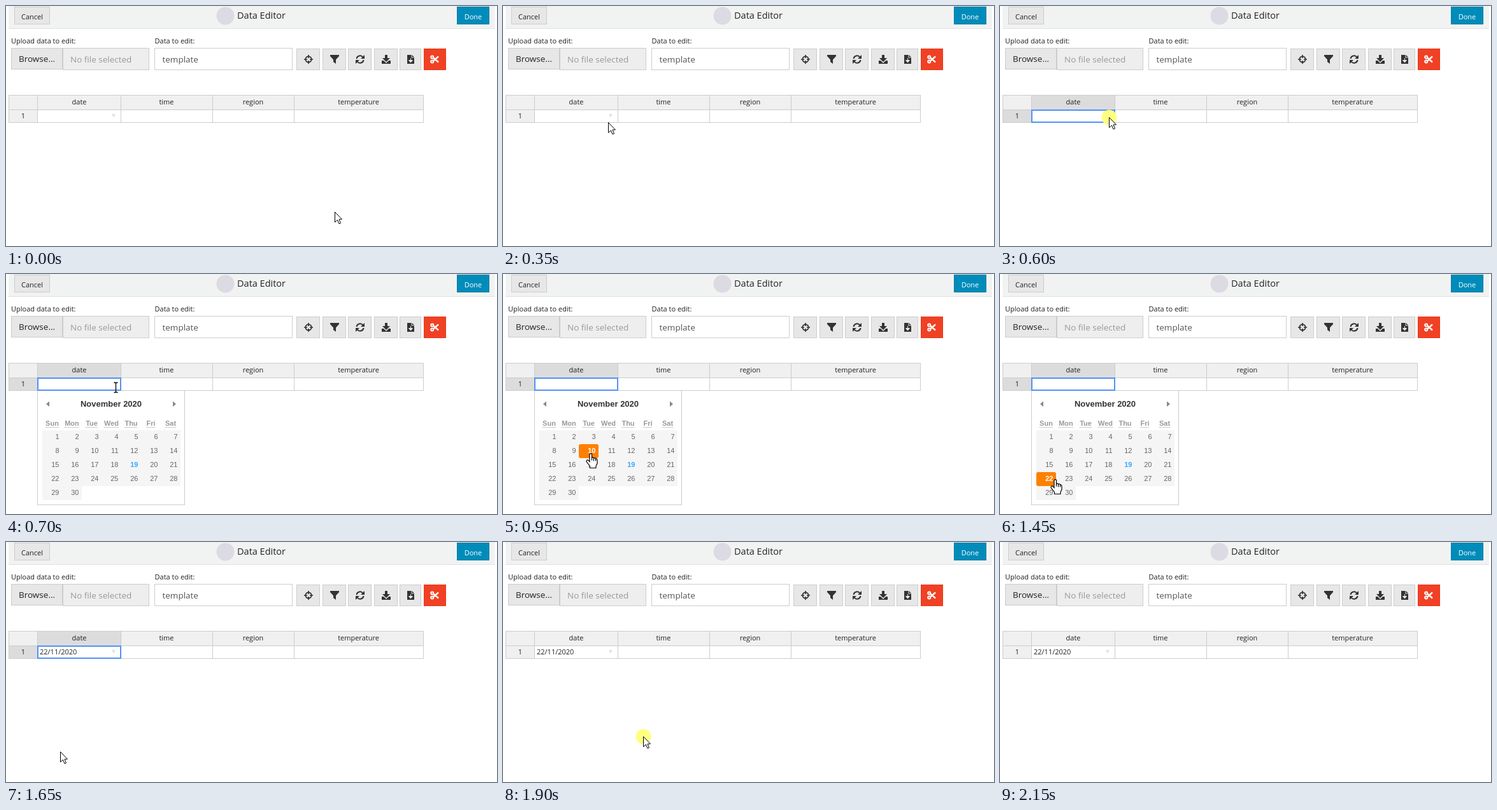
An HTML page for the animation above (2.25 s loop, 771x378 px).

```html
<!DOCTYPE html>
<html lang="en">
<head>
<meta charset="utf-8">
<title>Data Editor</title>
<style>
  html, body { margin: 0; width: 100%; height: 100%; overflow: hidden; background: #fff; }
  svg { display: block; width: 771px; height: 378px; }
  text { font: 11px "Open Sans", sans-serif; fill: #222; }
  .mid { text-anchor: middle; }
  .big { font-size: 13.5px; }
  .box { stroke: #ccc; }
  .icon { fill: none; stroke: #333; stroke-width: 2; }
  .solid { fill: #333; stroke: none; }
  #calendar text { font-family: "Liberation Sans", Arial, sans-serif; fill: #666; }
  #calendar .bold { font-weight: bold; }
  #calendar .weekday { fill: #999; font-weight: bold; }
  #calendar .today { fill: #3af; font-weight: bold; }
  #calendar .hover { fill: #fff; font-weight: bold; }
</style>
</head>
<body>
<svg viewBox="0 0 771 378">
  <rect x="4" width="764" height="35" fill="#f1f3f3"/>
  <path d="M4 35.5H768" stroke="#e0e0e0"/>
  <rect class="box" x="13.5" y="1.500" width="55" height="27" fill="#e7e7e7"/>
  <text class="mid" x="41" y="21">Cancel</text>
  <rect x="708.5" y="1.5" width="50" height="27" fill="#008cba" stroke="#0079a1"/>
  <text class="mid" x="733.5" y="21" style="fill:#fff">Done</text>
  <circle cx="344.500" cy="15.500" r="14" fill="#dcdae2"/>
  <text x="363" y="20" style="font-size:14.5px">Data Editor</text>

  <text x="8" y="59">Upload data to edit:</text>
  <text x="233.500" y="59">Data to edit:</text>
  <rect class="box" x="89.5" y="66.5" width="135" height="34" fill="#eee"/>
  <rect class="box" x="8.5" y="66.5" width="80" height="33" fill="#e7e7e7"/>
  <rect class="box" x="233.5" y="66.5" width="216" height="34" fill="#fff"/>
  <text class="big" x="20" y="88">Browse...</text>
  <text class="big" x="101" y="89" style="fill:#999">No file selected</text>
  <text class="big" x="245.500" y="89" style="fill:#555">template</text>

  <g id="buttons"></g>
  <g class="icon">
    <g transform="translate(475 84)">
      <circle r="4.700" stroke-width="1.700"/><path d="M-7 0H-2M2 0H7M0-7V-2M0 2V7" stroke-width="1.700"/>
    </g>
    <path class="solid" d="M509 77H523V79L518 84.500V91L514 88V84.500L509 79Z"/>
    <g transform="translate(556 84)">
      <path d="M-5.500-1A5.600 5.600 0 0 1 4.500-3.500M5.500 1A5.600 5.600 0 0 1-4.500 3.500"/>
      <path class="solid" d="M7-7V-1H1ZM-7 7V1H-1Z"/>
    </g>
    <path class="solid" d="M595 77H599V82H603L597 88L591 82H595ZM590 86H593L597 90L601 86H604V91H590Z"/>
    <path class="solid" d="M630 77H636.500V81.500H641V91H630ZM637.500 77L641 80.500H637.500Z"/>
    <path d="M635.500 82V86M632.500 85.500H638.500L635.500 89Z" stroke="#e7e7e7" fill="#e7e7e7" stroke-width="1"/>
  </g>
  <g transform="translate(673 84)" fill="none" stroke="#fff" stroke-width="2">
    <circle cx="-3.800" cy="-3.500" r="2"/><circle cx="-3.800" cy="3.500" r="2"/>
    <path d="M-2-2.500L6 4.500M-2 2.500L6-4.500" stroke-width="2.400"/>
  </g>

  <rect x="4" y="140" width="652" height="23" fill="#f0f0f0"/>
  <rect x="4" y="163" width="45" height="21" fill="#f0f0f0"/>
  <path id="selected" d="M49 140H180V163H49V184H4V163H49Z" fill="#dcdcdc"/>
  <path d="M4 140.500H656M4 163.500H656M4 183.500H656M4.500 140V184M49.500 140V184M180.500 140V184M324.500 140V184M452.500 140V184M655.500 140V184" stroke="#ccc"/>
  <g class="mid">
    <text x="115" y="155">date</text><text x="252" y="155">time</text>
    <text x="388" y="155">region</text><text x="553.500" y="155">temperature</text>
    <text x="27" y="177">1</text>
  </g>
  <path id="dropdown" d="M166 170H172L169 176Z" fill="#e3e3e3"/>
  <text id="value" x="53" y="177">22/11/2020</text>
  <g id="calendar">
    <rect class="box" x="49.5" y="183.500" width="231" height="180" fill="#fff"/>
    <path d="M68 200.500V209L63 204.750ZM262 200.500V209L267 204.750Z" fill="#888"/>
    <text class="mid bold" x="165" y="209" style="font-size:13px;fill:#333">November 2020</text>
    <path d="M57 246H274V334H119V356H57Z" fill="#f5f5f5"/>
    <rect id="hover" width="31" height="22" rx="3" fill="#ff8000"/>
    <g id="days"></g>
  </g>
  <rect id="outline" x="50" y="164" width="130" height="19" fill="none" stroke="#5292f7" stroke-width="2"/>
  <path id="caret" d="M53.500 166V180" stroke="#000"/>

  <g id="pointer">
    <circle id="click" r="12" fill="#ffff80"/>
    <path id="arrow" d="M0 0V16L4 12.500L6.500 18.500L9 17.500L6.500 11.500H11Z" fill="#fff" stroke="#000"/>
    <path id="beam" d="M-3-7.500H-1L0-6.500L1-7.500H3M0-6.500V7M-3 8H-1L0 7L1 8H3" fill="none" stroke="#000" stroke-width="1.300"/>
    <path id="hand" d="M-1.500 1.500Q0-1 2 1V7Q4 5.500 5 7.500Q7.500 6.500 8 8.500Q10.500 8 10.500 11V16L8.500 20V23H-1V20L-6.500 13Q-6.500 10-4 10.500L-1.500 13Z M2 7V11M5 8V12M8 9V12" fill="#fff" stroke="#000" stroke-width="1.200"/>
  </g>
</svg>
<script>
const LOOP = 2250, STEP = 50;
const $ = id => document.getElementById(id);
const show = (id, on) => $(id).style.display = on ? '' : 'none';

function add(parent, tag, attrs, content = '') {
  const el = document.createElementNS('http://www.w3.org/2000/svg', tag);
  for (const key in attrs) el.setAttribute(key, attrs[key]);
  el.textContent = content;
  $(parent).append(el);
  return el;
}

[[456, 36], [497, 36], [537, 36], [578, 36], [618, 33], [656, 34]].forEach(([x, width], i) =>
  add('buttons', 'rect', { x: x + .5, y: 67.5, width, height: 33,
    fill: i < 5 ? '#e7e7e7' : '#f04124', stroke: i < 5 ? '#ccc' : '#ea3a1c' }));

['Sun', 'Mon', 'Tue', 'Wed', 'Thu', 'Fri', 'Sat'].forEach((name, i) => {
  const x = 72.5 + 31 * i;
  const label = add('days', 'text', { x, y: 239, class: 'mid weekday' }, name);
  const half = label.getComputedTextLength() / 2;
  add('days', 'path', { d: `M${x - half} 241.5H${x + half}`, stroke: '#999', 'stroke-dasharray': '1 1' });
});

const days = Array.from({ length: 30 }, (_, i) => add('days', 'text', {
  x: 83.5 + 31 * (i % 7), y: 260 + 22 * Math.floor(i / 7),
  'text-anchor': 'end', class: i === 18 ? 'today' : ''
}, i + 1));

// Pointer stops: time, x, y
const path = [
  [0, 516, 324], [350, 165, 183], [550, 169, 172], [650, 172, 178], [750, 172, 178],
  [1050, 125, 319], [1150, 125, 319], [1400, 86, 323], [1500, 86, 323], [1600, 85, 330],
  [1700, 85, 330], [1850, 220, 306], [1950, 220, 306], [2100, 497, 326], [LOOP, 497, 326]
];

function pointerAt(t) {
  const i = path.findIndex(stop => stop[0] > t);
  const [t0, x0, y0] = path[i - 1], [t1, x1, y1] = path[i];
  const u = (t - t0) / (t1 - t0), k = u * u * (3 - 2 * u);
  return [x0 + (x1 - x0) * k, y0 + (y1 - y0) * k];
}

function draw(t) {
  const [x, y] = pointerAt(t);
  const selected = t >= 600 && t < 1850;
  const editing = t >= 700 && t < 1600;
  const col = Math.floor((x - 57) / 31), row = Math.floor((y - 246) / 22);
  const day = row * 7 + col;
  const hovering = editing && col >= 0 && col < 7 && row >= 0 && day < 30;
  const typing = editing && y < 184;

  show('selected', selected);
  show('outline', selected);
  show('calendar', editing);
  show('dropdown', !editing);
  show('value', t >= 1600);
  show('caret', editing && Math.floor(t / 350) % 2);

  show('hover', hovering);
  $('hover').setAttribute('x', 57 + 31 * col);
  $('hover').setAttribute('y', 246 + 22 * row - 1 + 1);
  days.forEach((el, i) => el.classList.toggle('hover', hovering && i === day));

  show('pointer', t < 2150);
  $('pointer').setAttribute('transform', `translate(${Math.round(x) + .5} ${Math.round(y) + .5})`);
  show('click', t >= 600 && t < 700 || t >= 1850 && t < 1950);
  show('beam', typing);
  show('hand', hovering);
  show('arrow', !typing && !hovering);
}

const start = performance.now();
function tick() {
  const t = (performance.now() - start) % LOOP;
  draw(Math.floor(t / STEP) * STEP);
  requestAnimationFrame(tick);
}
tick();
</script>
</body>
</html>
```
